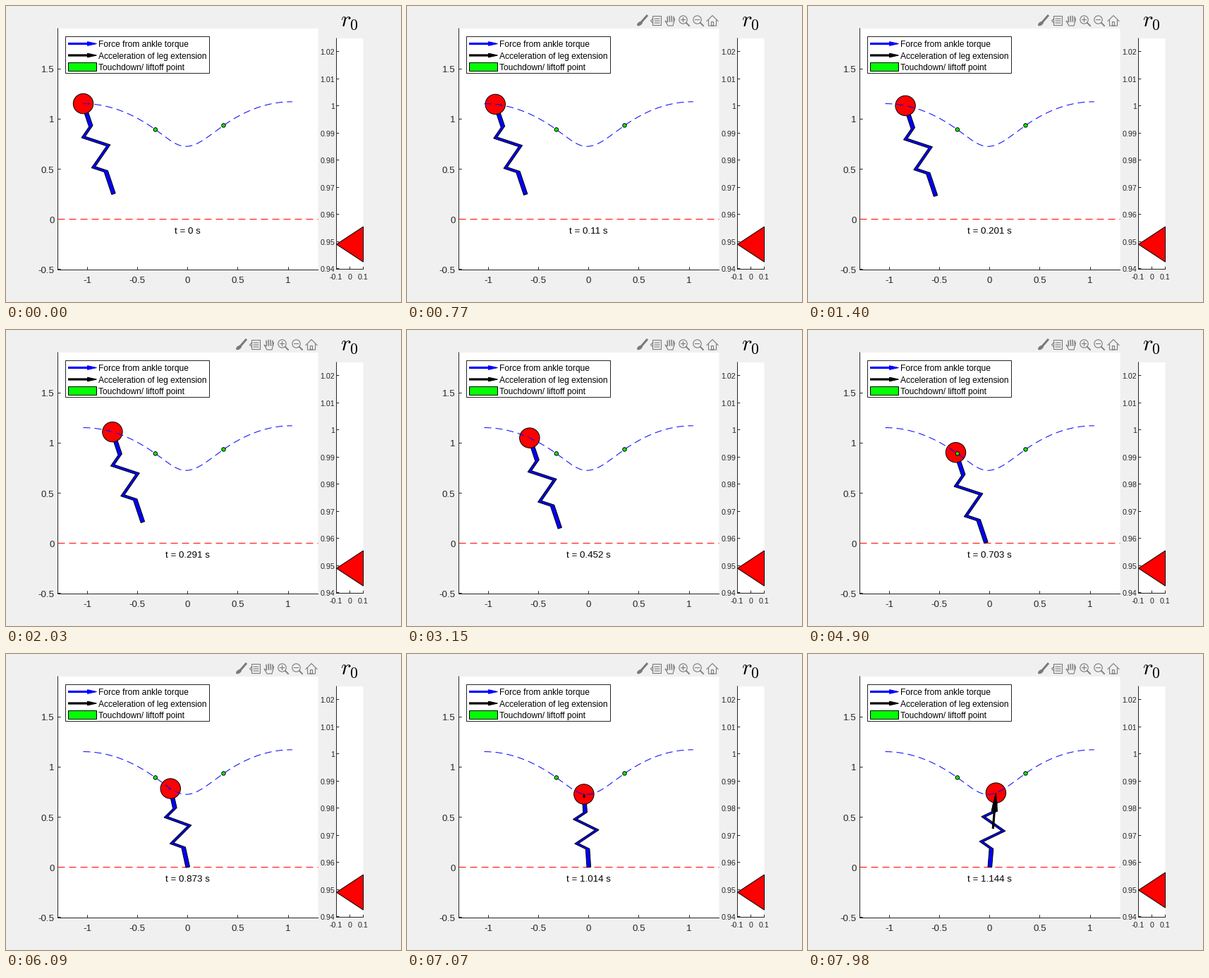
These frames come from a looping animation (560x420 px, 8 s). A matplotlib script:

```python
import numpy as np
import matplotlib.pyplot as plt
from matplotlib.animation import FuncAnimation
from matplotlib.patches import Circle, Ellipse, Polygon, Rectangle

W, H, DPI = 560, 420, 80
PT = 72 / DPI                      # points per pixel
INTERVAL, LOOP, HOLD = 20, 8000, 70
DT = 0.010038                      # simulated seconds per picture
SUB = 10                           # simulation steps per picture

plt.rcParams.update({"font.family": "Liberation Sans",
                     "mathtext.fontset": "cm", "path.snap": False})

INK, GRAY = "#262626", "#7a7a7a"
X0, Y0, SCALE = 257.8, 302.5, 142.3  # main axes: origin, pixels per unit
REST, Y_DOWN, TILT = 0.949, 0.8935, 0.3237
DASH = dict(linestyle=(0, (10, 6)), dash_capstyle="butt")

fig = plt.figure(figsize=(W / DPI, H / DPI), dpi=DPI, facecolor="#f0f0f0")
ax = fig.add_axes([0, 0, 1, 1])
ax.set_xlim(0, W)
ax.set_ylim(H, 0)
ax.axis("off")


def simulate():
    """Spring-legged hop: flight, compression, extension, flight (g = 1)."""
    dt = DT / SUB
    pos, vel = np.array([-1.042, 1.152]), np.array([1.0, 0.0])
    springs = [(0, 0), (23.2, REST), (15.4, 1), (0, 0)]  # stiffness, length
    path, switches = [], []
    while pos[0] < 1.041:
        path.append(pos)
        r = np.hypot(*pos)
        done = (pos[1] <= Y_DOWN, pos @ vel > 0, r >= 1, False)
        if done[len(switches)]:
            switches.append(len(path) - 1)
        k, length = springs[len(switches)]
        vel = vel + dt * (k * (length - r) * pos / r - np.array([0, 1]))
        pos = pos + dt * vel
    return np.array(path), switches


def px(p):
    return np.asarray(p) * [SCALE, -SCALE] + [X0, Y0]


def r0_px(r):
    return 141.8 + (1 - r) * 3850


def crisp(v):
    return np.floor(v) + 0.5


def line(xs, ys, color=INK, width=1.0, z=2, **kw):
    return ax.plot(xs, ys, color=color, lw=width * PT, zorder=z, **kw)[0]


def label(x, yc, s, size, ha="center", color=INK, z=3):
    return ax.text(x, yc + 0.36 * size, s, fontsize=size * PT, ha=ha,
                   va="baseline", color=color, zorder=z)


def shape(patch, face, z, edge="black", width=1.0):
    patch.set(facecolor=face, edgecolor=edge, linewidth=width * PT, zorder=z)
    return ax.add_patch(patch)


def axis_of(start, end):
    """Unit vector from start to end and its normal."""
    u = (end - start) / np.hypot(*(end - start))
    return u, np.array([u[1], -u[0]])


class Arrow:
    """Thick arrow with a slim filled head."""

    def __init__(self, color, z, width=3.2):
        self.shaft = line([], [], color, width, z, solid_capstyle="butt")
        self.head = shape(Polygon(np.zeros((3, 2))), color, z, color, 1)

    def set(self, tail, tip, head, half):
        tail, tip = np.array(tail, float), np.array(tip, float)
        shown = np.hypot(*(tip - tail)) > 0.5
        self.shaft.set_visible(shown)
        self.head.set_visible(shown)
        if shown:
            u, n = axis_of(tail, tip)
            base = tip - u * head
            self.shaft.set_data(*np.stack([tail, base + u]).T)
            self.head.set_xy([tip, base + n * half, base - n * half])


def draw_axes(left, top, right, bottom, xticks, yticks, size, gap):
    """Ticks are (position, value) pairs."""
    shape(Rectangle((left, top), right - left, bottom - top), "white", 0, "none", 0)
    line([left, left, right], [top, bottom, bottom], solid_joinstyle="miter")
    tick = 0.01 * max(right - left, bottom - top)
    for x, v in xticks:
        line([crisp(x)] * 2, [bottom, bottom - tick])
        label(x - 0.4, bottom + size, f"{v:g}", size)
    for y, v in yticks:
        line([left, left + tick], [crisp(y)] * 2)
        label(left - gap, y + 0.5, f"{v:g}", size, "right")


def draw_legend():
    shape(Rectangle((84.5, 43.5), 204, 52), "white", 8, INK)
    names = ("Force from ankle torque", "Acceleration of leg extension",
             "Touchdown/ liftoff point")
    for i, (name, color) in enumerate(zip(names, ("blue", "black", "lime"))):
        y = 53.5 + 16.5 * i
        label(131, y + 0.5, name, 12, "left", "black", 9)
        if i < 2:
            Arrow(color, 9).set((88, y), (128.5, y), 13, 2.8)
        else:
            shape(Rectangle((88.5, y - 6), 40, 12), color, 9)


def toolbar():
    """Grey tool icons, 20 px apart, above the main axes."""
    brush, tip, hand, zoom_in, zoom_out, home = np.arange(333, 434, 20)
    mid = 21
    parts = []

    def stroke(*pts, width=1.1):
        parts.append(line(*zip(*pts), GRAY, width, 4))

    def box(x, y, w, h):
        parts.append(shape(Rectangle((x, y), w, h), "none", 4, GRAY, 1.1))

    stroke((brush + 7, 14), (brush, 22), width=3)
    parts.append(shape(Ellipse((brush - 3, 25), 9, 5, angle=-35), GRAY, 4, "none"))

    box(tip - 4.5, 14.5, 12, 13)
    stroke((tip - 4.5, 18), (tip - 7.5, mid), (tip - 4.5, 24))
    for y in (18, mid, 24):
        stroke((tip - 2, y), (tip + 5, y))

    for i in range(4):
        x = hand - 4 + 3 * i
        stroke((x, 15.5 - (i in (1, 2))), (x + 0.5, 22), width=1.5)
    stroke((hand - 4, 23), (hand - 7, 21), (hand - 3, 28), (hand + 4, 28),
           (hand + 6.5, 18))

    for x in (zoom_in, zoom_out):
        parts.append(shape(Circle((x - 1.5, 19.5), 5.7), "none", 4, GRAY, 1.1))
        stroke((x + 3, 24), (x + 7, 28), width=1.8)
        stroke((x - 4.5, 19.5), (x + 1.5, 19.5))
    stroke((zoom_in - 1.5, 16.5), (zoom_in - 1.5, 22.5))

    stroke((home - 8, 21.5), (home, 13.5), (home + 8, 21.5))
    stroke((home - 5.5, 20), (home - 5.5, 28), (home + 5.5, 28), (home + 5.5, 20))
    box(home - 1.5, 22.5, 3, 5.5)
    return parts


def leg_outline(hip, foot):
    along = np.array([0, 3, 4, 6, 8, 9, 12]) / 12
    side = np.array([0, 0, -15, 15, -15, 0, 0])
    _, n = axis_of(hip, foot)
    mid = hip + np.outer(along, foot - hip) + np.outer(side, n)
    return np.vstack([mid - 2.8 * n, (mid + 2.8 * n)[::-1]])


path, (down, low, up) = simulate()

draw_axes(73.5, 32, 442.5, 374.5,
          [(X0 + SCALE * v, v) for v in np.arange(-1, 1.1, 0.5)],
          [(Y0 - SCALE * v, v) for v in np.arange(-0.5, 1.6, 0.5)], 13.33, 5)
draw_axes(468.5, 46, 506.5, 373.5,
          [(487.5 + 190 * v, v) for v in (-0.1, 0, 0.1)],
          [(r0_px(v), v) for v in np.arange(94, 103) / 100], 10.67, 2.5)
ax.text(486.8, 28.5, "$r_0$", fontsize=31 * PT, ha="center", va="baseline")

line([73.5, 442.5], [Y0, Y0], "red", z=2.5, **DASH)
line(*px(path).T, "blue", z=5, **DASH)
for k in (down, up):
    shape(Circle(px(path[k]), 2.7), "lime", 6)
draw_legend()

icons = toolbar()
leg = shape(Polygon(np.zeros((14, 2))), "blue", 3)
ball = shape(Circle((0, 0), 14.2), "red", 4)
torque = Arrow("blue", 6.5, 1.5)
thrust = Arrow("black", 7)
marker = shape(Polygon(np.zeros((3, 2))), "red", 3)
clock = label(257.5, 318.3, "", 13.33, color="black", z=5)


def update(i):
    n = (i * INTERVAL + INTERVAL // 2) // HOLD
    k, t = n * SUB, n * DT
    hip = px(path[k])
    swing = REST * np.array([np.sin(TILT), -np.cos(TILT)])
    foot = px(path[k] + swing if k < down else (0, 0))
    u, side = axis_of(hip, foot)

    leg.set_xy(leg_outline(hip, foot))
    ball.center = tuple(hip)
    clock.set_text(f"t = {round(t, 3):g} s")

    # leg thrust grows from mid-stance on; ankle torque fades before it
    push = max(0, (t - 1.0) / 0.1443)
    thrust.set(hip + u * 51 * push, hip, 26 * push, 4.3 * min(1, push))
    twist = 3 * np.sin(np.pi * np.clip((k - down) / (low - down), 0, 1))
    torque.set(hip - side * twist, hip, twist / 2, twist / 4)

    y = r0_px(REST + 0.0008 * push**3)
    marker.set_xy([(468.5, y), (506.5, y - 25), (506.5, y + 25)])
    for part in icons:
        part.set_visible(n > 0)
    return []


anim = FuncAnimation(fig, update, frames=LOOP // INTERVAL, interval=INTERVAL,
                     init_func=lambda: update(0), repeat=True, repeat_delay=0,
                     blit=False)
plt.show()
```
